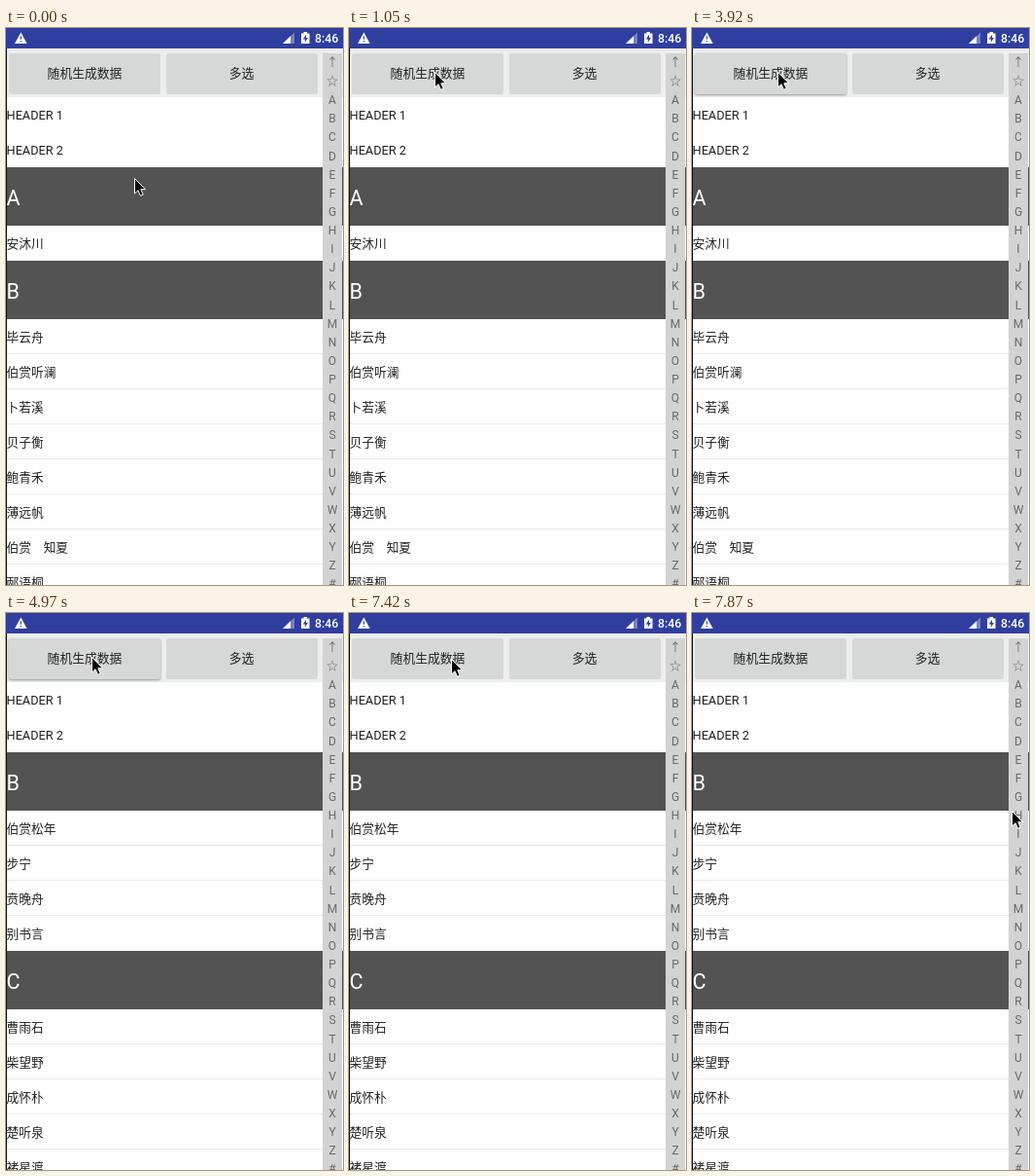
An HTML page that plays this animation: 347x572 px, repeating every 8000 ms.

```html
<!DOCTYPE html>
<html lang="zh-CN">
<head>
<meta charset="utf-8">
<title>Contact list</title>
<style>
html, body { margin: 0; width: 100%; height: 100%; overflow: hidden; background: #fff; }
svg { display: block; width: 347px; height: 572px; font-family: Roboto, "Noto Sans CJK SC", "Noto Sans CJK", "Noto Sans", sans-serif; }
.row { font-size: 12.7px; fill: #212121; }
.head { font-size: 21.5px; fill: #fff; }
.btn text { font-size: 12.8px; fill: #212121; text-anchor: middle; }
.btn rect { fill: #d6d7d7; }
.pressed rect { filter: drop-shadow(0 1px 1px rgba(0, 0, 0, .38)); }
.index { font-size: 12px; fill: #696969; text-anchor: middle; }
</style>
</head>
<body>
<svg viewBox="0 0 347 572" xmlns="http://www.w3.org/2000/svg">
  <rect width="347" height="572" fill="#fefefe"/>
  <rect y="21" width="347" height="50" fill="#eee"/>
  <g id="lists"></g>
  <g class="btn" id="generate"><rect x="3" y="26" width="156" height="42" rx="2"/><text x="81" y="51">随机生成数据</text></g>
  <g class="btn"><rect x="165" y="26" width="156" height="42" rx="2"/><text x="242.5" y="51">多选</text></g>
  <rect x="326" y="26" width="20" height="546" fill="#d3d3d3"/>
  <g class="index" id="index"></g>
  <rect y="21" width="1" height="551" fill="#111"/>
  <rect width="347" height="21" fill="#303f9f"/>
  <g fill="#fff">
    <path d="M9 16L15.3 4.5L21.6 16Z"/>
    <path d="M14.7 8.3h1.2v3.4h-1.2zM14.7 12.9h1.2v1.3h-1.2z" fill="#303f9f"/>
    <path d="M285 16L297 4.500V16Z" opacity=".35"/>
    <path d="M285 16L293 8.300V16Z"/>
    <path d="M304 5.500h2.500v-1.500h3.500v1.500h2.500v10.500h-8.500z"/>
    <path d="M309 6.800L305.800 11.500H307.800V14.800L310.900 10H309Z" fill="#303f9f"/>
    <text x="318" y="15" font-size="12.3" font-weight="500">8:46</text>
  </g>
  <path id="cursor" d="M.5 .5V16L4 12.700L6.500 18.300L9.200 17.100L6.800 11.700H11.500Z" fill="#000" stroke="#fff" stroke-width="1"/>
</svg>
<script>
const NS = 'http://www.w3.org/2000/svg';
const $ = id => document.getElementById(id);

const LOOP = 8000;
const REFRESH = 4970;
const PRESS = [3770, 5120];
// time, x, y of the pointer tip
const POINTER = [
  [0, 132, 154], [750, 103, 82], [900, 92, 56], [1050, 88, 45],
  [7420, 105, 47], [7570, 215, 99], [7720, 294, 160], [7870, 329, 203]
];
const LISTS = [
  { A: ['安沐川'], B: ['毕云舟', '伯赏听澜', '卜若溪', '贝子衡', '鲍青禾', '薄远帆', '伯赏　知夏', '邴语桐'] },
  { B: ['伯赏松年', '步宁', '贲晚舟', '别书言'], C: ['曹雨石', '柴望野', '成怀朴', '楚听泉', '褚星渡'] }
];

function add(parent, tag, attrs, text) {
  const el = document.createElementNS(NS, tag);
  for (const key in attrs) el.setAttribute(key, attrs[key]);
  if (text) el.textContent = text;
  return parent.appendChild(el);
}

function buildList(sections) {
  const g = add($('lists'), 'g', {});
  let y = 71;
  const row = text => {
    add(g, 'text', { class: 'row', x: .6, y: y + 23 }, text);
    y += 36;
  };
  row('HEADER 1');
  row('HEADER 2');
  for (const letter in sections) {
    add(g, 'rect', { y, width: 347, height: 60, fill: '#535353' });
    add(g, 'text', { class: 'head', x: .6, y: y + 39 }, letter);
    y += 60;
    sections[letter].forEach((name, i) => {
      if (i) add(g, 'rect', { y: y - 1, width: 326, height: 1, fill: '#ebebeb' });
      row(name);
    });
  }
  return g;
}

const lists = LISTS.map(buildList);
[...'↑☆ABCDEFGHIJKLMNOPQRSTUVWXYZ#'].forEach((c, i) =>
  add($('index'), 'text', { x: 336, y: 40 + i * 19.12 }, c));

function draw(t) {
  const [, x, y] = POINTER.filter(p => p[0] <= t).pop();
  $('cursor').setAttribute('transform', `translate(${x} ${y})`);
  $('generate').classList.toggle('pressed', t >= PRESS[0] && t < PRESS[1]);
  lists.forEach((g, i) => g.setAttribute('display', (t >= REFRESH) === (i === 1) ? 'inline' : 'none'));
}

const start = performance.now();
function tick() {
  draw((performance.now() - start) % LOOP);
  requestAnimationFrame(tick);
}
tick();
</script>
</body>
</html>
```
